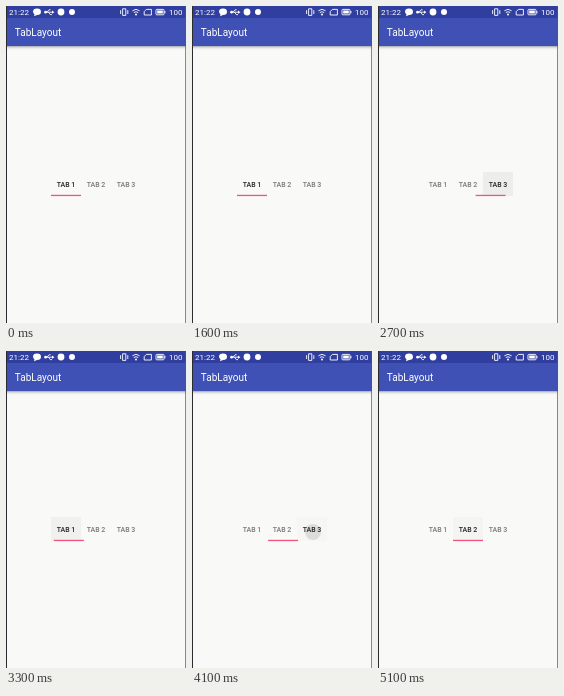
Recreate the animation shown at these times as an HTML page. Size 180 by 317 pixels, loop 5200 ms.

```html
<!DOCTYPE html>
<html lang="en">
<head>
<meta charset="utf-8">
<title>Tabs</title>
<style>
  html, body { margin: 0; width: 100%; height: 100%; overflow: hidden; background: #f9faf8; }
  svg { display: block; width: 100%; height: 100%; font-family: Roboto, sans-serif; }
  .status { fill: #fff; font-size: 8px; }
  .line { fill: none; stroke: #fff; stroke-width: .9; }
  .title { fill: #fff; font-size: 10px; }
  .tab { fill: #767776; font-size: 7px; font-weight: 500; text-anchor: middle; }
  .tab.on { fill: #222; }
</style>
</head>
<body>
<svg viewBox="0 0 180 317" preserveAspectRatio="none">
  <defs>
    <linearGradient id="shade" x2="0" y2="1">
      <stop offset="0" stop-color="#85888f" stop-opacity=".75"/>
      <stop offset=".5" stop-color="#b5b7b9" stop-opacity=".3"/>
      <stop offset="1" stop-color="#ccc" stop-opacity="0"/>
    </linearGradient>
    <clipPath id="cell"><rect id="clip" y="166" width="30" height="24"/></clipPath>
  </defs>
  <rect width="180" height="317" fill="#f9faf8"/>
  <rect y="40" width="180" height="4" fill="url(#shade)"/>
  <rect width="180" height="40" fill="#3f51b5"/>
  <rect width="180" height="12" fill="#303f9f"/>

  <g class="status">
    <text x="3" y="9.2">21:22</text>
    <text x="163" y="9.2">100</text>
    <path d="M27 5.6a4 3.3 0 1 1 4 3.4l-3 1.2.5-1.8a3.4 3.4 0 0 1-1.5-2.8z"/>
    <circle cx="55" cy="6" r="3.4"/>
    <circle cx="66" cy="6" r="3"/>
    <circle cx="39.6" cy="6.2" r="1.4"/>
    <path d="M46 4.6l2.4 1.6L46 7.8z"/>
    <path class="line" d="M39 6.2h7M41 6.2l2-2.4h1.6M42.5 6.2l1.8 2.4H46"/>
    <path class="line" d="M116.6 2.8h3.2v6.6h-3.2zM114.6 4.2v3.8M121.8 4.2v3.8"/>
    <path class="line" d="M126.4 4.8q3.6-3 7.2 0M127.8 6.6q2.2-1.8 4.4 0"/>
    <circle cx="130" cy="8.4" r="1"/>
    <path class="line" d="M138.2 9V5.6l2.2-2.2h5V9z"/>
    <rect class="line" x="150" y="3.4" width="8" height="5.4" rx=".8"/>
    <path d="M151.2 4.6h5.6v3h-5.6zM158.4 5h1v2.2h-1z"/>
  </g>
  <text class="title" x="8.8" y="30">TabLayout</text>

  <g clip-path="url(#cell)">
    <rect id="fill" y="166" width="30" height="24"/>
    <circle id="ripple" cy="181"/>
  </g>
  <text class="tab" x="60" y="181.3">TAB 1</text>
  <text class="tab" x="90" y="181.3">TAB 2</text>
  <text class="tab" x="120" y="181.3">TAB 3</text>
  <rect id="bar" y="188.8" width="30" height="1.3" fill="#f0527c"/>

  <rect width="1" height="317" fill="#2a2c30"/>
  <rect x="179.3" width=".7" height="317" fill="#55575c"/>
</svg>
<script>
  const LOOP = 5200, STEP = 100, SLIDE = 300;
  // [time, tab]
  const taps = [[-1000, 0], [1850, 1], [2555, 2], [3080, 0], [3680, 1], [4065, 2], [4805, 1]];
  const $ = id => document.getElementById(id);
  const tabs = document.querySelectorAll('.tab');
  const clamp = v => Math.max(0, Math.min(1, v));
  const left = tab => 45 + 30 * tab;

  // cubic-bezier(.4, 0, .2, 1)
  function ease(x) {
    let lo = 0, hi = 1, u = .5;
    for (let i = 0; i < 24; i++) {
      u = (lo + hi) / 2;
      const v = 1 - u;
      if (1.2 * v * v * u + .6 * v * u * u + u * u * u < x) lo = u; else hi = u;
    }
    return u * u * (3 - 2 * u);
  }

  function draw(t) {
    let i = taps.length - 1;
    while (taps[i][0] > t) i--;
    const [start, tab] = taps[i];
    const from = i ? taps[i - 1][1] : tab;
    const age = t - start, p = clamp(age / SLIDE);
    const x = left(tab);

    $('bar').setAttribute('x', left(from) + (x - left(from)) * (p < 1 ? ease(p) : 1));
    tabs.forEach((el, n) => el.classList.toggle('on', n === tab));

    $('clip').setAttribute('x', x);
    $('fill').setAttribute('x', x);
    $('fill').setAttribute('fill-opacity', .045 * clamp(age / 120) * clamp((420 - age) / 270));
    $('ripple').setAttribute('cx', x + 16);
    $('ripple').setAttribute('r', 4 + 16 * clamp(age / 140));
    $('ripple').setAttribute('fill-opacity', .12 * clamp((150 - age) / 130));
  }

  const begin = performance.now();
  function tick() {
    const t = Math.max(0, performance.now() - begin) % LOOP;
    draw(Math.floor(t / STEP) * STEP);
    requestAnimationFrame(tick);
  }
  tick();
</script>
</body>
</html>
```
